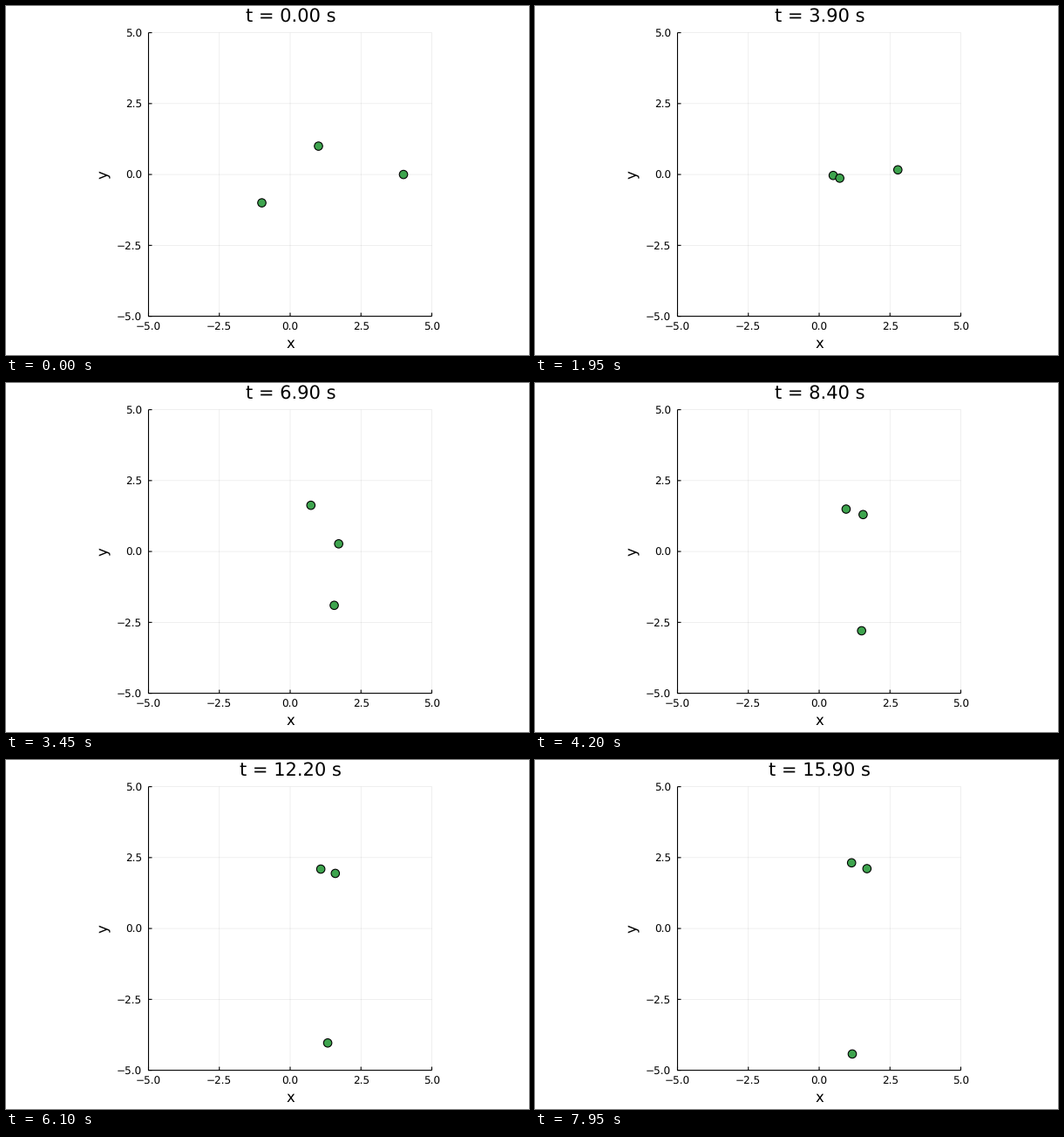
A matplotlib script for the animation above (8 s loop, 600x400 px).

```python
import matplotlib.pyplot as plt
from matplotlib.animation import FuncAnimation
from matplotlib.patches import Circle

FRAMES, INTERVAL = 160, 50
DT = 0.1                      # simulated seconds per frame
X0, Y0, UNIT = 326.0, 193.1, 32.5   # pixel place of the origin, pixels per unit
LEFT, RIGHT = X0 - 5 * UNIT, X0 + 5 * UNIT
TOP, BOTTOM = Y0 - 5 * UNIT, Y0 + 5 * UNIT
GREEN = (0.2422, 0.6433, 0.3044)


def accel(pos):
    """Gravity between three unit masses in the complex plane."""
    a, b, c = pos
    ab, bc, ca = b - a, c - b, a - c
    ab /= abs(ab) ** 3
    bc /= abs(bc) ** 3
    ca /= abs(ca) ** 3
    return ab - ca, bc - ab, ca - bc


def shift(p, q, k):
    return tuple(u + k * v for u, v in zip(p, q))


def rk4(p, v, h):
    a1 = accel(p)
    v2 = shift(v, a1, h / 2)
    a2 = accel(shift(p, v, h / 2))
    v3 = shift(v, a2, h / 2)
    a3 = accel(shift(p, v2, h / 2))
    v4 = shift(v, a3, h)
    a4 = accel(shift(p, v3, h))
    p = tuple(x + h / 6 * (a + 2 * b + 2 * c + d)
              for x, a, b, c, d in zip(p, v, v2, v3, v4))
    v = tuple(x + h / 6 * (a + 2 * b + 2 * c + d)
              for x, a, b, c, d in zip(v, a1, a2, a3, a4))
    return p, v


def simulate():
    p, v = (-1 - 1j, 1 + 1j, 4 + 0j), (0j, 0j, 0j)
    path = [p]
    for _ in range(FRAMES - 1):
        left = DT
        while left > 1e-12:
            near = min(abs(p[0] - p[1]), abs(p[1] - p[2]), abs(p[2] - p[0]))
            h = min(left, 0.005, 0.01 * near ** 1.5)
            p, v = rk4(p, v, h)
            left -= h
        path.append(p)
    return path


plt.rcParams.update({"font.family": "DejaVu Sans", "text.hinting": "none"})
fig = plt.figure(figsize=(6, 4), dpi=100, facecolor="white")
ax = fig.add_axes([0, 0, 1, 1])
ax.set(xlim=(0, 600), ylim=(400, 0))
ax.axis("off")


def px(n):
    return n * 0.72


def line(xs, ys, width=1.1, alpha=1, z=2):
    ax.plot(xs, ys, color="black", lw=px(width), alpha=alpha, zorder=z,
            solid_capstyle="butt", snap=False)


def label(x, y, text, size, ha="center", va="baseline", **kw):
    return ax.text(x, y, text, fontsize=px(size), ha=ha, va=va, **kw)


for value in (-5, -2.5, 0, 2.5, 5):
    gx, gy = X0 + value * UNIT, Y0 - value * UNIT
    line([gx, gx], [TOP, BOTTOM], 0.6, 0.1, z=1)
    line([LEFT, RIGHT], [gy, gy], 0.6, 0.1, z=1)
    line([gx, gx], [BOTTOM, BOTTOM - 4])
    line([LEFT, LEFT + 4], [gy, gy])
    name = f"{value:.1f}".replace("-", "\u2212")
    label(gx, 371.9, name, 12)
    label(156, gy + 5, name, 12, ha="right")

line([LEFT, LEFT], [TOP, BOTTOM])
line([LEFT - 0.5, RIGHT], [BOTTOM, BOTTOM])
label(X0, 392, "x", 16.5)
label(119.4, Y0, "y", 16.5, ha="right", va="center", rotation=90)
title = label(X0 + 0.3, 18, "", 21)

dots = [ax.add_patch(Circle((0, 0), 4.75, fc=GREEN, ec="black",
                            lw=px(1.1), zorder=5, snap=False))
        for _ in range(3)]
path = simulate()


def draw(i):
    title.set_text(f"t = {i * DT:.2f} s")
    for dot, z in zip(dots, path[i]):
        dot.center = X0 + z.real * UNIT, Y0 - z.imag * UNIT
    return [title, *dots]


anim = FuncAnimation(fig, draw, frames=FRAMES, interval=INTERVAL,
                     init_func=lambda: draw(0), repeat=True, repeat_delay=0)
plt.show()
```
